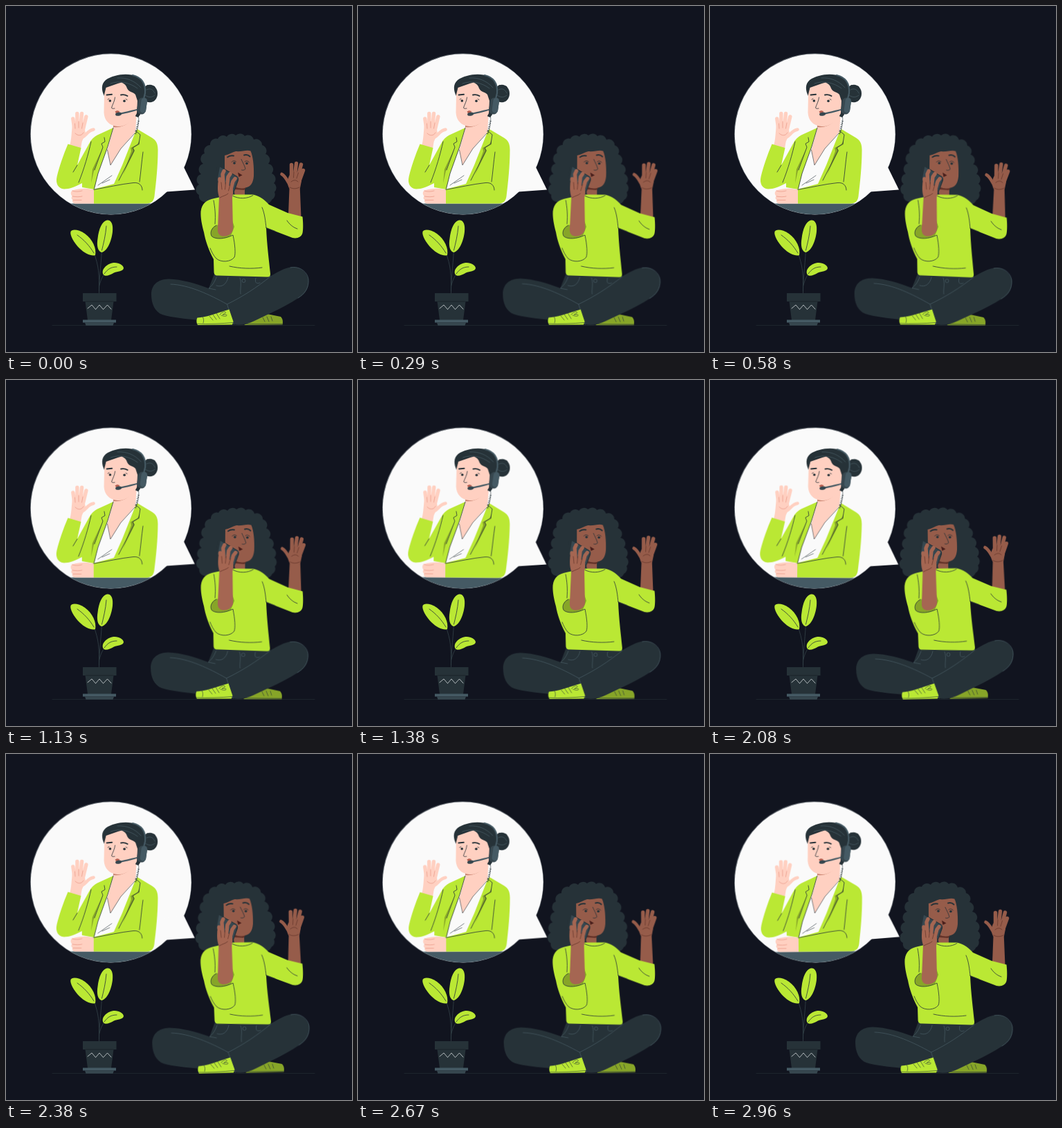
An HTML page that plays this animation: 500 px wide and 500 px high, repeating every 3 s.

```html
<!DOCTYPE html>
<html lang="en">
<head>
<meta charset="utf-8">
<title>Phone call</title>
<style>
html, body { margin: 0; width: 100%; height: 100%; overflow: hidden; background: #11141f; }
svg { display: block; width: 100vw; height: 100vh; }
path, polyline { stroke-linecap: round; stroke-linejoin: round; }
.lime { fill: #bae834; }
.olive { fill: #87a528; }
.dark { fill: #263238; }
.slate { fill: #455a64; }
.steel { fill: #37474f; }
.white { fill: #fafafa; }
.pale { fill: #ffd0c1; }
.brown { fill: #965c4a; }
.tan { fill: #a56652; }
.ink { fill: none; stroke: #263238; stroke-width: .8; }
.fine { fill: none; stroke: #263238; stroke-width: .6; }
.seam { fill: none; stroke: #4a5d66; stroke-width: .7; }
.crease { fill: none; stroke: #e79584; stroke-width: .7; }
.fold { fill: none; stroke: #5d3227; stroke-width: .7; }
.fingers { fill: none; stroke-width: 5.4; }
.thumb { fill: none; stroke-width: 4.6; }
.brow { fill: none; stroke: #263238; stroke-width: 1.9; }

/* gentle rocking; the bubble joins in after one second */
#caller { transform-origin: 324px 323px; animation: rock 3s linear infinite; }
#bubble { transform-origin: 154.5px 185px; animation: lateRock 3s linear infinite; }
@keyframes rock {
  0%, 100% { transform: rotate(0deg); }
  25% { transform: rotate(1deg); }
  75% { transform: rotate(-1deg); }
}
@keyframes lateRock {
  0%, 33.333% { transform: rotate(0deg); }
  58.333% { transform: rotate(1deg); }
  100% { transform: rotate(-.667deg); }
}
</style>
</head>
<body>
<svg viewBox="0 0 500 500">
  <defs><clipPath id="disc"><circle cx="151.7" cy="185.3" r="116"/></clipPath></defs>
  <path d="M67 461.5H446" stroke="#263238" stroke-width=".6"/>

  <g id="plant">
    <path d="M134.5 415C134 399 137 379 138.5 352M134.5 412C135 390 134 374 127 357M134.8 404C137 396 139 391 142 388" fill="none" stroke="#34434a" stroke-width=".8"/>
    <path class="lime" d="M129 360C131 350 125 337 114 329C105 322.500 95 322 93.500 326C92 331 98 342 106 350C114 358 124 362 129 360Z"/>
    <path class="lime" d="M138 356C132 354 131 345 132.500 336C134 322 139 311 146 309.500C153 309 155 317 154 326C152.500 340 146 355 138 356Z"/>
    <path class="lime" d="M141 388.500C137 383 143 374 153 371.500C161 369.500 170 374 170 379C169 384 161 383 156 385.500C150 389 144 391.500 141 388.500Z"/>
    <path class="ink" d="M103 331C113 338 121 347 127 357M145 318C144 331 141 343 138.500 353M142 387C147 380 152 377 160 377"/>
    <path class="dark" d="M111 415H159.500V427H155.500L152 454H118L114.500 427H111Z"/>
    <path d="M115 427H155" stroke="#1a2329"/>
    <polyline points="118,437 124,432 129.5,438.5 135,432 140.500,438.500 146.500,432 152,438" fill="none" stroke="#d5dadc" stroke-width=".8"/>
    <path class="slate" d="M111 453.500H159V457.500H111Z"/>
    <path class="steel" d="M114 457.500H156L154.500 461.700H115.500Z"/>
  </g>

  <g id="bubble">
    <circle cx="151.500" cy="185" r="116.200" fill="none" stroke="#7b868c" stroke-width=".6"/>
    <circle class="white" cx="151.700" cy="185.300" r="116"/>
    <path class="white" d="M257 233L273 265.500L231 268.500L215 240Z"/>
    <path class="slate" clip-path="url(#disc)" d="M30 285.500H270V305H30Z"/>

    <!-- raised hand -->
    <g class="pale" stroke="#ffd0c1">
      <path class="fingers" d="M99 178L96.800 163M103 177L102.800 155.500M107.500 177L109.500 155.500M111 180L115.800 160"/>
      <path class="thumb" d="M110 190C116 187 118 180 126.500 178.500"/>
      <path stroke="none" d="M96 172L113 174L115 184C113 190 110.500 193 109.500 197L108 206L92 202C95 192 94.500 182 96 172Z"/>
    </g>
    <path class="crease" d="M100 184C104 188 109 188 112 183M100 177L99.500 170M105 176V167M109.500 177L111 169"/>

    <!-- neck and shirt -->
    <path class="white" d="M149 196L189 182L176 222L158 258L126 266Z"/>
    <path class="pale" d="M155 168V177L146.500 208L151 230L166 206L187 182L189 152Z"/>
    <path d="M155 172C166 172 175 169 181 164C176 172 166 176 155 175Z" fill="#c98470"/>
    <path class="fine" d="M146.500 208L151 230L166 206L187 183M133 259L153 245M139 256L150 251"/>

    <!-- jacket -->
    <path class="lime" d="M89.500 199.500L108.500 205L103 230L120 199C123 193 127 189 132 186.500L155 176L147 203L133 242L127.500 265L110 262V256C100 261 92 264.500 84 264.500C75 264 71.500 256 73.500 247C77 232 83 215 89.500 199.500Z"/>
    <path class="lime" d="M190 178L211 190.500C217 194 219.500 199 219.500 208C219.500 231 217 254 214.500 275C213.500 282 210 285.500 203 285.500H127L126 265L156 257L168 230L187 182Z"/>
    <path class="olive" d="M140 204L127 238L123 256L125 236Z"/>
    <path class="olive" d="M193 193L193 200L184 205L186 209L169 244L181 210L180 205L190 200Z"/>
    <path class="ink" d="M155 176L147 203L133 242L127.500 264M142 190L143 196L138 199L140 204L128 237M187 180L194 186L192 199L183 205L185 209L163 252M123 196C119 214 113 235 105 255M103 230L97 240M198 211C196 225 195 239 193 254M126 265.500C147 262 165 257.500 184 255.500C193 254.500 197 260 197 266"/>

    <!-- resting hand -->
    <path class="pale" d="M127 265.500V285.500H101C97 285.500 95 283 96.500 280C94 279 94 276 96 275C93 273 93 268 96 266.500C106 264 114 262.500 127 265.500Z"/>
    <path class="crease" d="M96 267C101 269 106 268 110 267M96 275C102 276 106 276 110 275M97 280.500H109"/>

    <!-- head -->
    <ellipse class="dark" cx="208" cy="126.500" rx="11" ry="12.800"/>
    <path class="dark" d="M199 119L204 114L215 116L218 127L214 137L205 139L198 132Z"/>
    <path class="dark" d="M142 130C138 122 137 113 144 107C156 99 176 96 189 102C198 106 201 115 201 125C201 138 198 153 191 161L166 150Z"/>
    <path class="pale" d="M142 128L144.500 118C152 115.500 160 112 167 110.500C171 112 174 115 175 119C178 125 184 124 187 128L190 137L189 155C184 166 173 175 161 174C149 173 142 165 141.500 154Z"/>
    <path d="M183 100C196 103 202 112 201 126L198.500 136" fill="none" stroke="#455a64" stroke-width="2.200"/>
    <path class="seam" d="M151 112C164 107 179 111 190 119M161 104C174 103 186 108 195 118M203 121C209 118 213 121 215 126M201 129C207 133 211 132 215 129"/>
    <path class="brow" d="M145.500 128.500L153 127.800M166 128.500C170 127.500 173 128.500 175.500 130"/>
    <circle class="dark" cx="150.300" cy="137" r="1.800"/>
    <circle class="dark" cx="171" cy="137.300" r="1.800"/>
    <path class="ink" d="M147 135L149 134M173 134.500L175 135.500M157.500 132C157 138 154 142 152.500 147C153 148.500 155 148.500 157 148"/>
    <path d="M157.500 152.500L160.500 151L164 152L163 155H159Z" fill="#b65f50"/>
    <path d="M193 149C184 151 174 154 163 156.200" fill="none" stroke="#455a64" stroke-width="2.100"/>
    <ellipse class="steel" cx="162.500" cy="156.200" rx="4.500" ry="2.500" transform="rotate(-10 162.500 156.200)"/>
    <rect class="steel" x="190" y="132.500" width="13" height="24" rx="6.300" transform="rotate(8 196.500 144.500)"/>
    <rect class="slate" x="194.500" y="132.500" width="8.500" height="22" rx="4.200" transform="rotate(8 198 144)"/>
    <path class="fine" d="M191 157C193 165 191 173 188 184"/>
    <path d="M191.500 166C189 176 189 178 187 185" fill="none" stroke="#263238" stroke-width="2.600" stroke-dasharray=".7 2" style="stroke-linecap:butt"/>
  </g>

  <g id="caller">
    <path class="dark" id="curls"/>

    <!-- raised arm -->
    <g class="brown" stroke="#965c4a">
      <path class="fingers" d="M412.500 249L412.500 229.500M417 248L419.500 227.500M421 250L426.500 229M423.500 254L429.500 237.500"/>
      <path class="thumb" d="M410 258C406 252 404 246 398.500 243"/>
      <path stroke="none" d="M410 244L424 246L427 253L424.800 264L426.500 306L408 302L409.500 264C406 257 406 251 410 244Z"/>
    </g>
    <path class="fold" d="M410 262C415 265 420 264 424 262M412 254C416 251 419 251 422 254M415.500 248L416 240M420 249L422.500 241"/>

    <!-- face -->
    <path class="brown" d="M316 216C322 215 327 211 332 210C341 211 348 207 353.500 209.500C357 217 358.500 232 358 246C357 256 354 261 345 263V274L331 275L329 262C320 258 316 250 316 240Z"/>
    <path d="M331 261C337 264 342 264 347 262.500L344 266L331 265Z" fill="#643329"/>
    <path class="brow" d="M320 218.500C322.500 216.500 326 216 329 216.500M344 215.500C347.500 214.500 350.500 215.500 352.500 217.500"/>
    <circle class="dark" cx="330" cy="227" r="1.800"/>
    <circle class="dark" cx="348" cy="227.500" r="1.800"/>
    <path class="ink" d="M326 225.500C328 223 331 223.500 332.500 225M345 225C347 223 350 224 351.500 226M340 221.500C342 226 345 231 346 235.500C344 237.500 342 237.500 340.500 237"/>
    <path d="M335 240.500L341.500 244.500L336.500 247Z" fill="#4a1f1c"/>

    <!-- legs -->
    <path class="olive" d="M344 461L358 453L372 444L397 449C400 452 400.500 456 399.500 460.500Z"/>
    <path class="fine" d="M347 459.500H399M371 450L374 456M377 449L380 456M383 449L385 455"/>
    <path class="dark" d="M301 387H382V390.500C393 384 402 379 411 377.500C424 375.500 434 384 437 394C438.500 405 434 415 424 421C410 430 397 437 382 444L359 455C349 460 338 462 329 460L325 446L279 454C259 452 239 450 226 446C215 442 210 430 210 417C210 403 219 395 235 394.500C254 395 274 401 293 408Z"/>
    <path class="seam" d="M238 402C265 403 294 417 319.500 431C342 420 362 407 382 391M319.500 431L329 460M304 392C301 400 298 404 293 408L303 410M304 404C312 407 319 402 321 392M338 393C341 400 338 409 339 416M361 393C359 400 362 402 367 400M411 378C425 375 436 385 437 395C438 407 432 416 422 422"/>
    <circle class="seam" cx="343.500" cy="397" r="2.500"/>
    <path class="lime" d="M276.500 450.500C289 450 301 445 322.500 438.500L328.500 456L327 460.500L277 461C275 458 275 453 276.500 450.500Z"/>
    <path class="fine" d="M276 459.300C293 460 311 459 328 457.500M294 448L299 454M299 446L304 453M304 444L309 452M309 446C315 438 322 443 313 446C322 444 321 451 311 447M284 449C286 452 286 455 285 458"/>

    <!-- sweater -->
    <path class="lime" d="M301 278C310 276 319 274 329 272.500L357 272.500C367 275 374 280 380 287L407 299L428.500 304.500C429.500 314 429.500 323 428.500 328C427 334 421 336.500 414 335L376 320.500C377 345 380 367 382 387C382 390 381 391.500 378 391.500L306 389.500C302 389.500 300.500 387.500 300.500 384L300 366C292 351 288 338 286 327C283 316 281 306 281.500 297C283 285 290 280 301 278Z"/>
    <path class="ink" d="M328 274.500C336 279 349 279 357 273.500M370 291C374 300 375 312 376 320.500M376 320.500L389 325.500M300 281C302 292 303 301 302 315M323 376C338 379.500 355 380 370 378M406 310C410 316 415 320 421 322"/>
    <path class="lime" d="M297 319L328 322C331 336 332 351 331 361C329 368 319 371 310 369C300 366 295 352 291 339Z"/>
    <path class="olive" d="M304 317C297 320 294 328 297.500 333C303 337.500 316 337 325 332L330 319L327 310Z"/>
    <path class="ink" d="M304 317C297 320 294 328 297.500 333C303 337.500 316 337 328 331C331 345 332 358 330 363C325 370 311 371 304 365C300 361 297 355 295 350"/>

    <!-- phone and near arm -->
    <path class="dark" d="M305 231.500L308 230.500L334 246C336 247.500 336.500 249.500 336 252L330.500 267C330 269 328 269 326 268L305 256C303 254 302 252 302.500 250Z"/>
    <path class="steel" d="M309 232.500L335.500 248L329.500 267L305.500 252Z"/>
    <g class="tan" stroke="#a56652">
      <path class="fingers" d="M310 266L309 250M314.500 264L313 243L315 238.500M319 265L321 247L324 242.500M324 268L328 253.500L331 249.500"/>
      <path stroke="none" d="M306.500 255L327 261C329 268 328 272 327 277L328 323C326 331 318 333.500 312 332.500C307 331 305.500 327 306 322L308 276C306 270 305.500 264 306.500 255Z"/>
    </g>
    <path class="fold" d="M312 265L311 255M316.500 265L317.500 255M321.500 267L324 258M309 277C314 274 318 274 321 271"/>
  </g>
</svg>
<script>
const rim = [
  [289, 283], [279, 273], [279, 258], [282, 243], [285, 228], [287, 213], [295, 201],
  [306, 192], [319, 189], [332, 187], [345, 188], [358, 193], [370, 201], [375, 214],
  [379, 228], [384, 242], [387, 256], [388, 269], [384, 280], [371, 284]
];
const [start, ...rest] = rim;
document.getElementById("curls").setAttribute("d",
  `M${start}` + rest.map(p => `A8.5 8.5 0 0 1 ${p}`).join("") + "Z");
</script>
</body>
</html>
```
